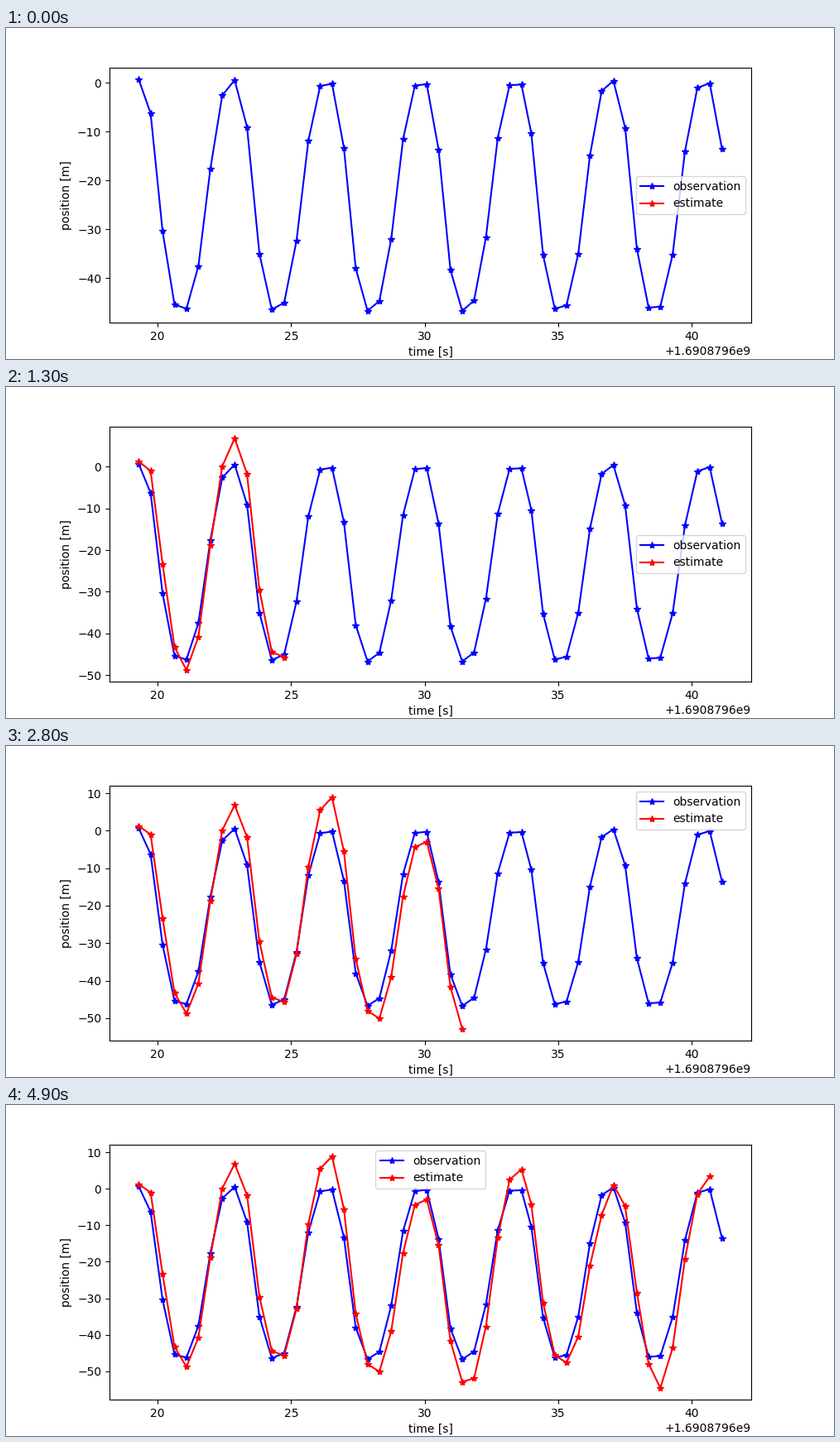
A matplotlib script that plays this animation: 1000x400 px, repeating every 5000 ms.

```python
import numpy as np
import matplotlib.pyplot as plt
from matplotlib.animation import FuncAnimation

EPOCH = 1690879600
SAMPLES = 50
PERIOD = 3.538
FIRST_TROUGH = 20.96

# Nearly even sampling whose rate drifts a little
k = np.arange(SAMPLES)
t = np.interp(k, [0, 7, 13, 32, 33, 44, 49],
              [19.29, 22.42, 25.20, 33.62, 33.99, 38.82, 41.13])
phase = 2 * np.pi * (t - FIRST_TROUGH) / PERIOD

# Flattened, slightly skewed oscillation between about -47 and 0.5
swing = -np.cos(phase) + 0.06 * np.sin(2 * phase) - 0.04
observed = -22.6 + 31.2 * np.tanh(swing)

# The estimate lags, overshoots at the turning points, and wanders
lag = -3.7 * np.sin(phase) - 3.0 * np.cos(phase)
drift = np.interp(k, [0, 2, 4, 16, 24, 27, 31, 36, 39, 42, 44, 48],
                  [-3, 4, 1.2, 4.8, -7, -4.4, 1.2, 2, -6.5, 3, -4.8, -0.8])
estimated = observed + lag + drift

times = EPOCH + t
fig, ax = plt.subplots(figsize=(10, 4), dpi=100)


def draw(n):
    """Show all observations and the first n estimates."""
    ax.clear()
    ax.plot(times, observed, "b*-", label="observation")
    ax.plot(times[:n], estimated[:n], "r*-", label="estimate")
    ax.set_xlabel("time [s]")
    ax.set_ylabel("position [m]")
    ax.legend(loc="best")


anim = FuncAnimation(fig, draw, frames=SAMPLES, interval=100,
                     init_func=lambda: draw(0), repeat=True, repeat_delay=0)
plt.show()
```
